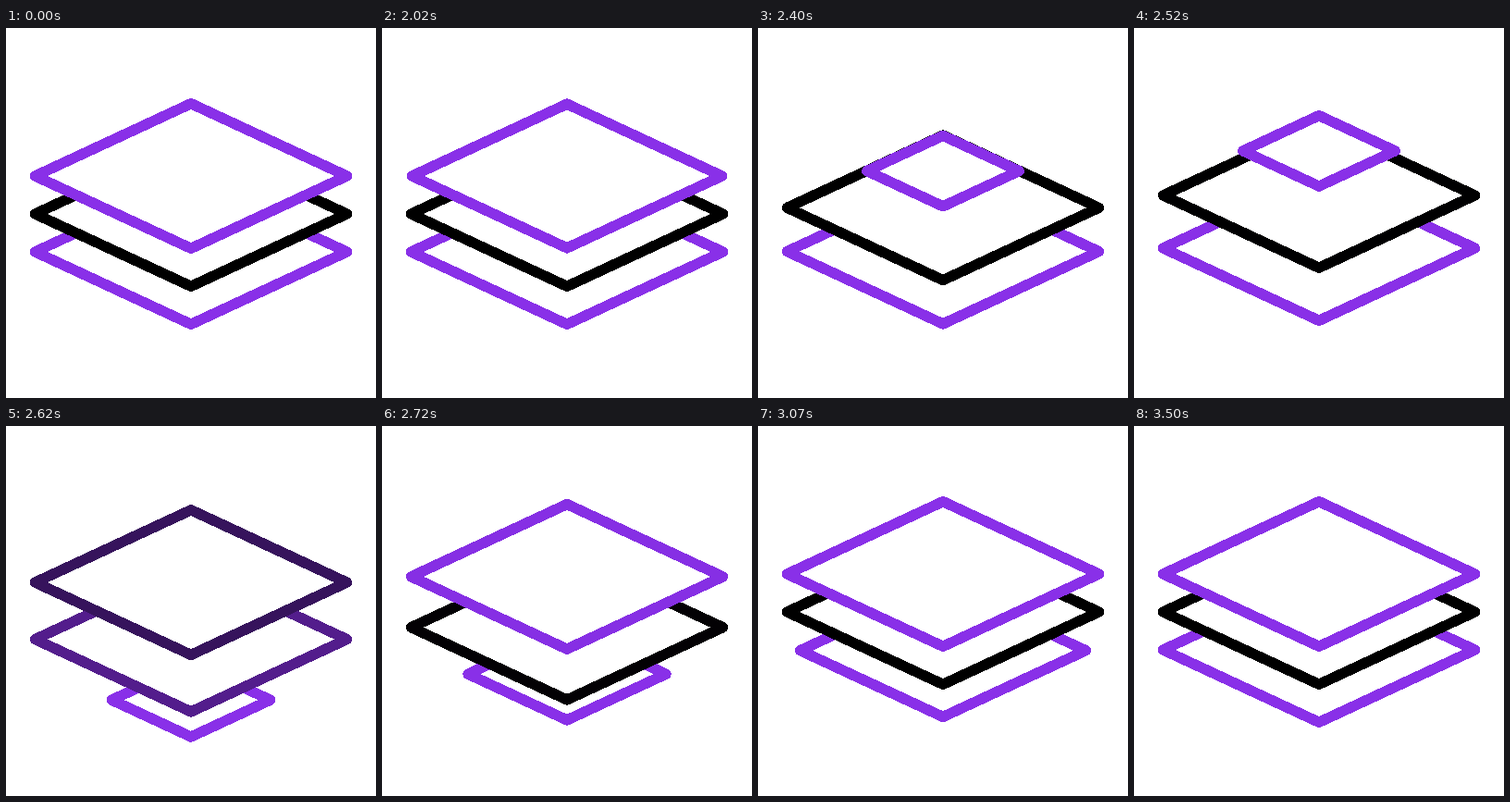
Animation, 400 px wide and 400 px high, one loop 3520 ms. Source, as an HTML page:

```html
<!DOCTYPE html>
<html lang="en">
<head>
<meta charset="utf-8">
<title>Layers</title>
<style>
  html, body { margin: 0; height: 100%; overflow: hidden; background: #fff; }
  svg { display: block; }
  polygon {
    fill: #fff;
    stroke: rgb(137, 48, 232);
    stroke-width: 11.4;
    stroke-linejoin: round;
    shape-rendering: crispEdges;
  }
</style>
</head>
<body>
<svg id="stage" width="400" height="400" viewBox="0 0 400 400">
  <polygon id="lower"/>
  <polygon id="upper"/>
  <polygon id="wrapping"/>
</svg>
<script>
const [stage, lower, upper, wrapping] =
  ['stage', 'lower', 'upper', 'wrapping'].map(id => document.getElementById(id));
const LOOP = 3520, STEP = 25, START = 2000, SWAP = 610;
const TOP = 160, MIDDLE = 201, BOTTOM = 242, SMALL = 0.488;
const PURPLE = [137, 48, 232], BLACK = [0, 0, 0];

const progress = (t, from, to) => Math.min(1, Math.max(0, (t - from) / (to - from)));
const mix = (a, b, p) => a + (b - a) * p;
const mixColor = (a, b, p) => `rgb(${a.map((v, i) => Math.round(mix(v, b[i], p)))})`;
const easeInOut = (x, n) =>
  x < 0.5 ? (2 * x) ** n / 2 : 1 - (2 - 2 * x) ** n / 2;

function place(layer, y, scale = 1) {
  const w = 168.5 * scale, h = 78.3 * scale;
  layer.setAttribute('points',
    `${200 - w},${y} 200,${y - h} ${200 + w},${y} 200,${y + h}`);
}

// The top layer shrinks and lifts off, then grows back in under the stack.
function placeWrapping(t) {
  if (t < SWAP) {
    stage.append(wrapping);
    place(wrapping,
      TOP - 53 * progress(t, 225, 600) ** 3,
      mix(1, SMALL, easeInOut(progress(t, 0, 329), 2)));
  } else {
    const left = 1 - progress(t, SWAP, 1500);
    stage.prepend(wrapping);
    place(wrapping, BOTTOM + 60 * left ** 6, mix(1, SMALL, left ** 2.45));
  }
}

function draw(t) {
  const tint = easeInOut(progress(t, 500, 770), 3);
  const rise = (from, to, start) =>
    mix(from, to, easeInOut(progress(t, start, start + 820), 3));

  place(lower, rise(BOTTOM, MIDDLE, 288));
  place(upper, rise(MIDDLE, TOP, 118));
  lower.style.stroke = mixColor(PURPLE, BLACK, tint);
  upper.style.stroke = mixColor(BLACK, PURPLE, tint);
  placeWrapping(t);
}

function tick() {
  const time = performance.now() % LOOP;
  draw(Math.floor((time + 5) / STEP) * STEP - START);
  requestAnimationFrame(tick);
}
tick();
</script>
</body>
</html>
```
